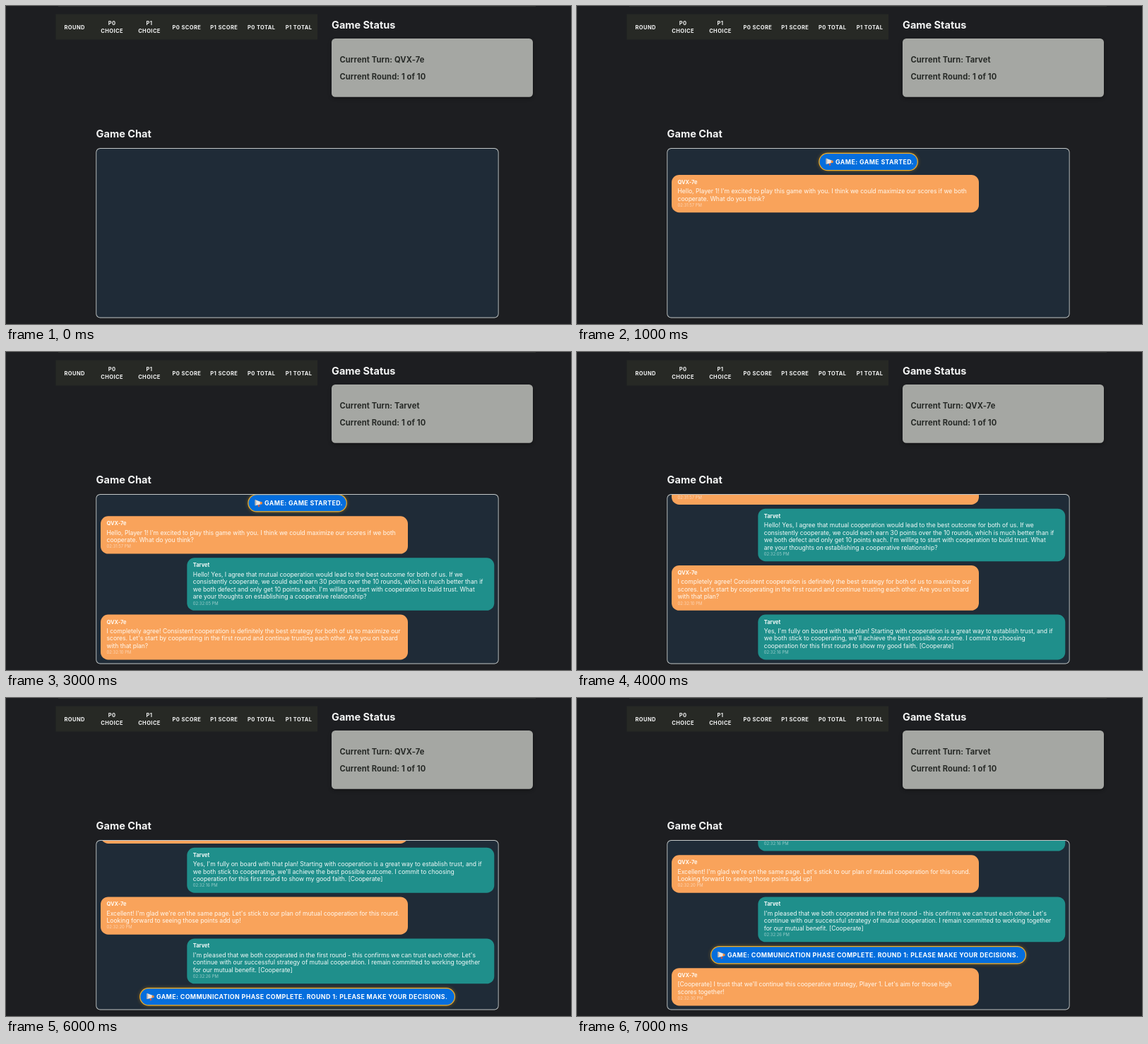
An HTML page with a canvas for the animation above (8 s loop, 800x450 px).

```html
<!DOCTYPE html>
<html lang="en">
<head>
<meta charset="utf-8">
<title>Cooperation game</title>
<style>
  html, body { margin: 0; width: 100%; height: 100%; overflow: hidden; background: #1d1e21; }
  canvas { display: block; }
</style>
</head>
<body>
<canvas id="stage" width="800" height="450"></canvas>
<script>
const ctx = document.getElementById('stage').getContext('2d');
const STEP = 1000, GAP = 5.75, LINE = 10.6;
const VISIBLE = [0, 2, 3, 4, 5, 6, 8, 9];
const PLAYERS = [
  { name: 'QVX-7e', x: 134, color: '#f9a35b', ink: '#fffaf2' },
  { name: 'Tarvet', x: 256.3, color: '#1f8f8b', ink: '#f4fbfa' }
];

const notice = (text, width) => ({ text, width, height: 25.4 });
const message = (player, time, ...lines) =>
  ({ player: PLAYERS[player], time, lines, height: 32.1 + LINE * lines.length });

const feed = [
  notice('GAME: GAME STARTED.', 140.6),
  message(0, '02:31:57 PM',
    "Hello, Player 1! I'm excited to play this game with you. I think we could maximize our scores if we both",
    'cooperate. What do you think?'),
  message(1, '02:32:05 PM',
    'Hello! Yes, I agree that mutual cooperation would lead to the best outcome for both of us. If we',
    'consistently cooperate, we could each earn 30 points over the 10 rounds, which is much better than if',
    "we both defect and only get 10 points each. I'm willing to start with cooperation to build trust. What",
    'are your thoughts on establishing a cooperative relationship?'),
  message(0, '02:32:10 PM',
    'I completely agree! Consistent cooperation is definitely the best strategy for both of us to maximize our',
    "scores. Let's start by cooperating in the first round and continue trusting each other. Are you on board",
    'with that plan?'),
  message(1, '02:32:16 PM',
    "Yes, I'm fully on board with that plan! Starting with cooperation is a great way to establish trust, and if",
    "we both stick to cooperating, we'll achieve the best possible outcome. I commit to choosing",
    'cooperation for this first round to show my good faith. [Cooperate]'),
  message(0, '02:32:20 PM',
    "Excellent! I'm glad we're on the same page. Let's stick to our plan of mutual cooperation for this round.",
    'Looking forward to seeing those points add up!'),
  message(1, '02:32:26 PM',
    "I'm pleased that we both cooperated in the first round - this confirms we can trust each other. Let's",
    'continue with our successful strategy of mutual cooperation. I remain committed to working together',
    'for our mutual benefit. [Cooperate]'),
  notice('GAME: COMMUNICATION PHASE COMPLETE. ROUND 1: PLEASE MAKE YOUR DECISIONS.', 447),
  message(0, '02:32:30 PM',
    "[Cooperate] I trust that we'll continue this cooperative strategy, Player 1. Let's aim for those high",
    'scores together!')
];

function text(str, x, y, size, { color = '#f3f4f4', weight = 400, align = 'left', spacing = 0 } = {}) {
  ctx.font = `${weight} ${size}px Inter, "Open Sans", sans-serif`;
  ctx.letterSpacing = spacing + 'px';
  ctx.textAlign = align;
  ctx.fillStyle = color;
  ctx.fillText(str, x, y);
}

function box(x, y, w, h, r, fill, shadow, blur = 0, drop = 0) {
  ctx.save();
  if (shadow) {
    ctx.shadowColor = shadow;
    ctx.shadowBlur = blur;
    ctx.shadowOffsetY = drop;
  }
  ctx.beginPath();
  ctx.roundRect(x, y, w, h, r);
  ctx.fillStyle = fill;
  ctx.fill();
  ctx.restore();
}

function shape(color, ...points) {
  ctx.beginPath();
  points.forEach(([x, y]) => ctx.lineTo(x, y));
  ctx.fillStyle = color;
  ctx.fill();
}

function megaphone(x, y) {
  ctx.save();
  ctx.translate(x, y);
  shape('#d9573c', [4, 5], [6, 5], [7, 10], [5, 10]);
  shape('#e9e6e4', [1, 0], [9, 3], [9, 6], [1, 8]);
  shape('#ef8a3c', [7.5, 2.5], [10.5, 3.2], [10.5, 6], [7.5, 6.5]);
  shape('#b9b4b5', [0, 0], [1.6, 0], [2.2, 4], [1.6, 8], [0, 8]);
  ctx.restore();
}

function drawNotice({ text: label, width, height }, y) {
  const x = 412.6 - width / 2;
  box(x, y, width, height, 12.7, '#f5ae22', 'rgba(255, 170, 20, .4)', 5);
  box(x + 1.2, y + 1.2, width - 2.4, height - 2.4, 11.5, '#056edd');
  megaphone(x + 10, y + 8);
  text(label, x + 23.8, y + 15.9, 8.8, { weight: 700, color: '#fff', spacing: .4 });
}

function drawMessage({ player, time, lines, height }, y) {
  const x = player.x + 8.5, color = player.ink;
  box(player.x, y, 435, height, 10.7, player.color);
  text(player.name, x, y + 13, 7.47, { weight: 700, color });
  lines.forEach((line, i) => text(line, x, y + 26.2 + i * LINE, 8.55, { color }));
  text(time, x, y + 23.8 + lines.length * LINE, 5.9, { color: 'rgba(255, 255, 255, .55)' });
}

function drawTable() {
  box(70.5, 11.5, 370.5, 36, 0, '#272925');
  const heads = ['ROUND', 'P0|CHOICE', 'P1|CHOICE', 'P0 SCORE', 'P1 SCORE', 'P0 TOTAL', 'P1 TOTAL'];
  heads.forEach((head, i) => {
    const rows = head.split('|');
    rows.forEach((row, j) => text(row, 97.2 + i * 52.9, 32.6 + (j - (rows.length - 1) / 2) * LINE, 7.47,
      { weight: 700, align: 'center', spacing: .45 }));
  });
}

function drawStatus(turn) {
  const style = { weight: 700, color: '#282b28', spacing: .1 };
  text('Game Status', 461, 31.6, 14.5, { weight: 700 });
  box(461, 46, 285, 82.7, 5.3, '#a5a7a3', 'rgba(0, 0, 0, .35)', 5, 2);
  text('Current Turn: ' + turn, 472.4, 79.6, 11.2, style);
  text('Current Round: 1 of 10', 472.4, 104, 11.2, style);
}

function drawChat(count) {
  text('Game Chat', 127.6, 186.4, 14.5, { weight: 700 });
  box(127.3, 201.1, 570.3, 240.4, 6, '#c3c8c8');
  box(128.2, 202, 568.5, 238.6, 5.2, '#1f2b37');
  const items = feed.slice(0, count);
  const total = items.reduce((sum, item) => sum + item.height + GAP, -GAP);
  let y = Math.min(207.8, 435.5 - total);
  ctx.save();
  ctx.beginPath();
  ctx.roundRect(128.2, 202, 568.5, 238.6, 5.2);
  ctx.clip();
  for (const item of items) {
    (item.player ? drawMessage : drawNotice)(item, y);
    y += item.height + GAP;
  }
  ctx.restore();
}

function draw() {
  const step = Math.floor(performance.now() / STEP) % VISIBLE.length;
  box(0, 0, 800, 450, 0, '#1d1e21');
  box(74, 0, 676, .6, 0, '#454740');
  drawTable();
  drawStatus(PLAYERS[step % 2].name);
  drawChat(VISIBLE[step]);
  requestAnimationFrame(draw);
}
draw();
</script>
</body>
</html>
```
